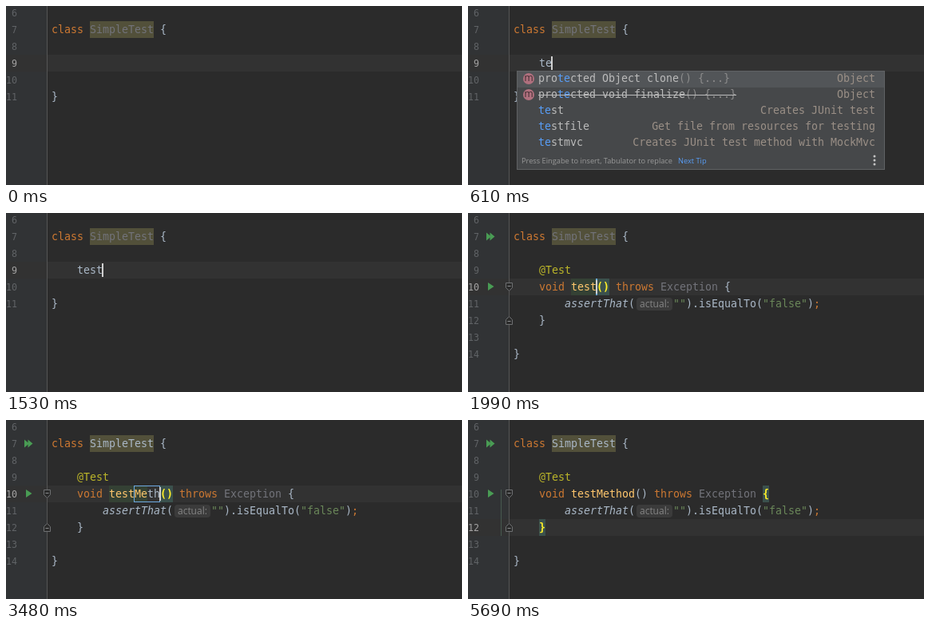
These frames come from a looping animation (571 px wide and 224 px high, 5760 ms). An HTML page:

```html
<!DOCTYPE html>
<html lang="en">
<head>
<meta charset="utf-8">
<title>Live template in a code editor</title>
<style>
  html, body { margin: 0; width: 100%; height: 100%; overflow: hidden; background: #2b2b2b; }
  svg { display: block; width: 571px; height: 224px; }
  text { font: 13.29px "DejaVu Sans Mono", monospace; white-space: pre; }
  .number { font-size: 11.63px; text-anchor: end; }
  .hint { font: 12px "Open Sans", sans-serif; }
  .tip { font: 9.25px "Open Sans", sans-serif; }
  .italic { font-style: italic; }
  .bold { font-weight: bold; }
  .right { text-anchor: end; }
</style>
</head>
<body>
<svg id="stage" viewBox="0 0 571 224"></svg>
<script>
const LOOP = 5760, CHAR = 8, LEFT = 57, ROW = 21;
const C = {
  text: '#a9b7c6', keyword: '#cc7832', unused: '#72737a', note: '#bbb529', method: '#ffc66d',
  string: '#6a8759', brace: '#ffef28', braceBack: '#3b514d', nameBack: '#344134', classBack: '#52503a',
  link: '#589df6', item: '#bbbbbb', dim: '#8c8c8c', detail: '#9a8f86', green: '#499c54'
};

// Each step changes part of the editor state.
const steps = [
  [0, { typed: '', popup: null, expanded: false, caret: false, suffix: '', known: -1,
        icons: false, hint: false, used: false, done: false, settled: false }],
  [70, { caret: true }],
  [530, { typed: 't' }],
  [610, { typed: 'te', popup: 'te' }],
  [740, { typed: 'tes' }],
  [830, { popup: 'tes' }],
  [920, { typed: 'test' }],
  [1000, { popup: 'test' }],
  [1530, { popup: null }],
  [1680, { expanded: true }],
  [1910, { icons: true, known: 0 }],
  [1990, { hint: true }],
  [2470, { suffix: 'M' }],
  [2550, { suffix: 'Me' }],
  [2930, { known: 2 }],
  [3230, { suffix: 'Met', used: true }],
  [3480, { suffix: 'Meth' }],
  [3630, { suffix: 'Metho' }],
  [3860, { suffix: 'Method' }],
  [4090, { done: true }],
  [4410, { settled: true, known: 6 }],
  [5690, { caret: false }]
];

const top_ = line => 61 + ROW * (line - 9);
const rect = (x, y, w, h, fill, more = '') =>
  `<rect x="${x}" y="${y}" width="${w}" height="${h}" fill="${fill}" ${more}/>`;
const text = (x, y, value, fill, cls = '') =>
  `<text x="${x}" y="${y}" fill="${fill}" class="${cls}">${value}</text>`;
const path = (d, fill, stroke = 'none') => `<path d="${d}" fill="${fill}" stroke="${stroke}"/>`;

// Tokens are [value, colour, class, background]; a number moves the pen in pixels.
function code(line, indent, tokens) {
  let x = LEFT + indent * CHAR, out = '';
  for (const token of tokens) {
    if (typeof token === 'number') { x += token; continue; }
    const [value, fill = C.text, cls, back] = token;
    const w = value.length * CHAR;
    if (back) out += rect(x, top_(line), w, ROW, back);
    if (value.trim()) out += text(x, top_(line) + 15, value, fill, cls);
    x += w;
  }
  return out;
}

const matched = (value, on) => on ? [value, C.brace, 'bold', C.braceBack] : [value];
const caretAt = (x, line) => rect(x - 1, top_(line) + 2, 2, 17, '#d0d0d0');
const triangle = (x, y, w) => path(`M${x} ${y - 5}l${w} 5l${-w} 5z`, C.green);

function foldMark(line, dir) {
  const y = top_(line) + 10.5;
  return path(`M47.5 ${y - 5 * dir}h8v${6 * dir}l-4 ${4 * dir}l-4 ${-4 * dir}z`, '#2b2b2b', '#6e7072')
    + path(`M49.5 ${y - dir}h4`, 'none', '#8a8c8e');
}

function frame(current, last) {
  let out = rect(0, 0, 571, 224, '#2b2b2b') + rect(0, 0, 51, 224, '#313335')
    + rect(0, top_(current), 571, ROW, '#323232') + rect(51, 0, 1, 224, '#555555');
  for (let n = 6; n <= last; n++)
    out += text(14, top_(n) + 15, n, n === current ? '#a4a3a3' : '#606366', 'number');
  return out;
}

function popupItem(y, key, value, detail, tail) {
  const at = value.indexOf(key), end = at + key.length;
  let out = text(88, y, value.slice(0, at), C.item)
    + text(88 + at * CHAR, y, key, C.link)
    + text(88 + end * CHAR, y, value.slice(end), C.item)
    + text(510, y, detail, C.detail, 'right');
  if (tail) out += text(88 + value.length * CHAR, y, tail, C.dim)
    + `<circle cx="76" cy="${y - 4}" r="7" fill="#b0707e"/>`
    + `<text x="76" y="${y - 1}" fill="#3a2a2e" class="hint" text-anchor="middle">m</text>`;
  return out;
}

function popup(key) {
  const items = [
    ['test', 'Creates JUnit test'],
    ['testfile', 'Get file from resources for testing'],
    ['testmvc', 'Creates JUnit test method with MockMvc']
  ];
  const first = key === 'te';
  if (first) items.unshift(['protected Object clone', 'Object', '() {...}'],
                           ['protected void finalize', 'Object', '() {...}']);
  const h = items.length * 20 + 24, foot = 82 + items.length * 20 + 11;
  let out = rect(61.5, 81.5, 460, h - 1, '#46484a', 'stroke="#606264"')
    + rect(62, 82, 459, 20, '#525558');
  items.forEach((item, i) => out += popupItem(95 + i * 20, key, ...item));
  if (first) out += rect(88, 111, 248, 1, C.item);
  const [tip, linkX] = first
    ? ['Press Eingabe to insert, Tabulator to replace', 263]
    : ['Strg+Unten and Strg+Oben will move caret down and up in the editor', 383];
  out += text(67, foot + 3.5, tip, '#999999', 'tip') + text(linkX, foot + 3.5, 'Next Tip', C.link, 'tip');
  for (const dy of [-5, 0, 5]) out += `<circle cx="509" cy="${foot + dy}" r="1.5" fill="#c4c4c4"/>`;
  return out;
}

const classLine = used => code(7, 0, [
  ['class ', C.keyword], ['SimpleTest', used ? C.text : C.unused, '', C.classBack], [' {']
]);

function typing(s) {
  return frame(9, 11) + classLine(false) + code(9, 4, [[s.typed]]) + code(11, 0, [['}']])
    + (s.caret ? caretAt(89 + s.typed.length * CHAR, 9) : '')
    + (s.popup ? popup(s.popup) : '');
}

function expanded(s) {
  const known = Math.max(s.known, 0), analysed = s.known >= 0;
  const back = analysed && !s.settled ? C.nameBack : '';
  const nameColor = analysed ? C.method : C.text;
  const end = 161 + s.suffix.length * CHAR;
  let out = frame(s.done ? 12 : 10, 14) + classLine(s.used)
    + code(9, 4, [['@Test', C.note]])
    + code(10, 4, [
        ['void ', C.keyword], ['test', nameColor, '', back],
        [s.suffix.slice(0, known), nameColor, '', back], [s.suffix.slice(known)],
        matched('()', !s.done), [' throws ', C.keyword],
        ['Exception', analysed ? C.unused : C.text], [' '], matched('{', s.done)
      ])
    + code(11, 8, [
        ['assertThat', C.text, 'italic'], ['('], s.hint ? 48 : 0, ['""', C.string],
        [').isEqualTo('], ['"false"', C.string], [')'], [';', C.keyword]
      ])
    + code(12, 4, [matched('}', s.done)]) + code(14, 0, [['}']]);
  if (s.hint) out += rect(211, 106, 45, 16, '#3b3b3b', 'rx="4"') + text(215, 118, 'actual:', '#858585', 'hint');
  if (s.icons) out += triangle(23, 29.5, 6) + triangle(27.5, 29.5, 6) + triangle(25, 92, 7.5)
    + foldMark(10, 1) + foldMark(12, -1);
  if (s.done) out += rect(41, 87, 1, 58, '#47594f');
  else out += rect(160.5, 82.5, Math.max(end - 161, 1), 20, 'none', 'stroke="#6ea9e0"');
  if (s.caret) out += s.done ? caretAt(97, 12) : caretAt(end, 10);
  return out;
}

const stage = document.getElementById('stage');
let shown = -1;

function tick() {
  const t = performance.now() % LOOP;
  const count = steps.filter(([at]) => at <= t).length;
  if (count !== shown) {
    shown = count;
    const s = Object.assign({}, ...steps.slice(0, count).map(step => step[1]));
    stage.innerHTML = s.expanded ? expanded(s) : typing(s);
  }
  requestAnimationFrame(tick);
}
tick();
</script>
</body>
</html>
```
